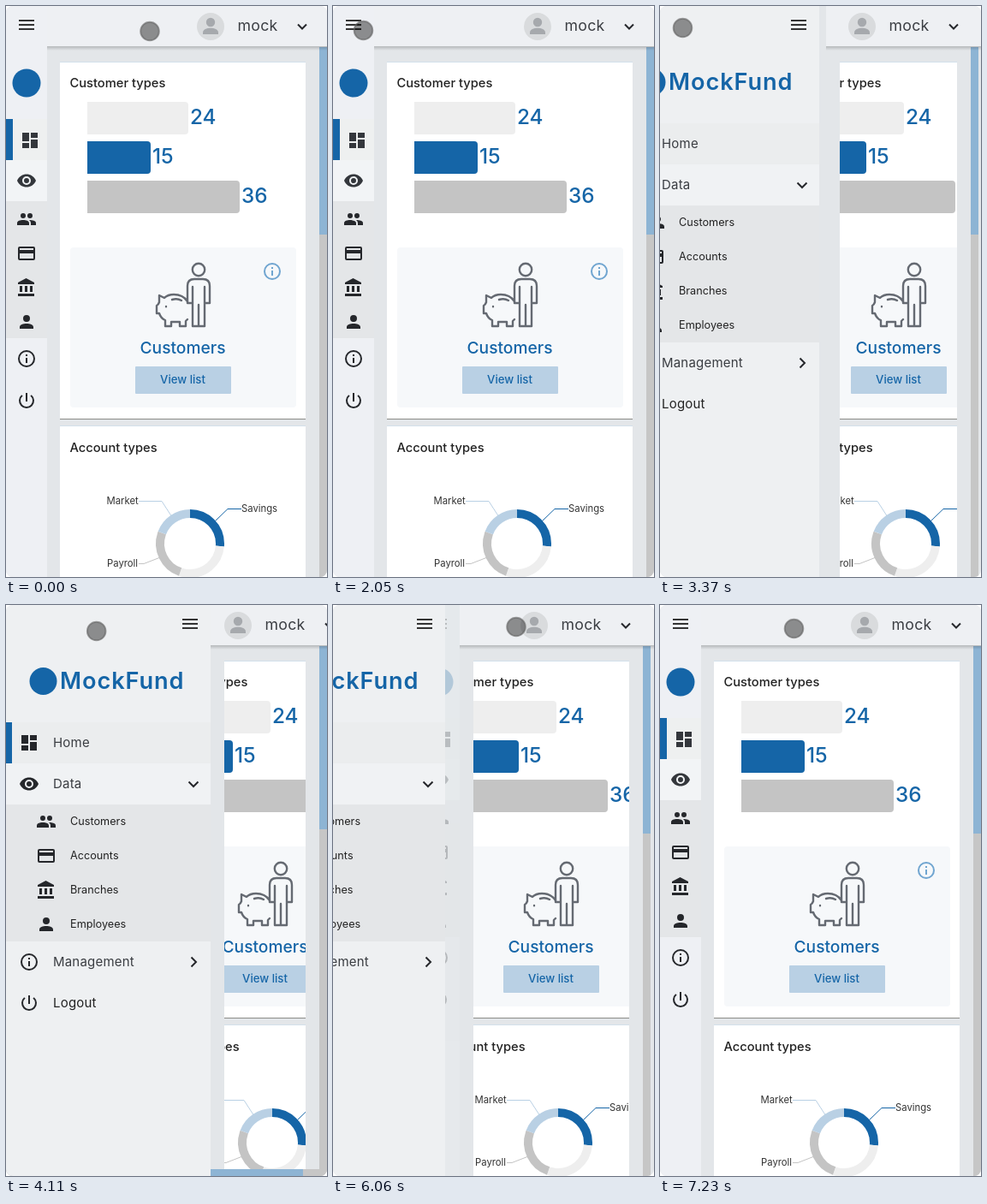
Write an HTML page that moves like this. It is 375 px wide and 667 px high and loops after 7840 ms.

```html
<!DOCTYPE html>
<html lang="en">
<head>
<meta charset="utf-8">
<title>Bank dashboard</title>
<style>
  html, body { margin: 0; width: 100%; height: 100%; overflow: hidden; background: #fff; }
  svg { display: block; border-radius: 8px; }
  text { font-family: Inter, "Open Sans", sans-serif; fill: #222; }
  .blue { fill: #1565a7; font-weight: 550; }
  .title { font-size: 14.7px; font-weight: 500; }
  .menu { font-size: 15px; letter-spacing: .2px; fill: #3a3d42; }
  .sub { font-size: 12.7px; }
  .tag { font-size: 11.3px; fill: #333; }
  .line { fill: none; stroke: #25272b; stroke-width: 2; }
</style>
</head>
<body>
<svg id="stage" width="375" height="667" viewBox="0 0 375 667"></svg>
<script>
const LOOP = 7840, MINI = 48, FULL = 239, BLUE = '#1565a7';

const ICONS = {
  home: 'M3 3h8v10H3zM3 15h8v6H3zM13 3h8v6h-8zM13 11h8v10h-8z',
  eye: 'M1 12C5 2 19 2 23 12C19 22 5 22 1 12zM7 12a5 5 0 0 0 10 0a5 5 0 0 0-10 0zM9 12a3 3 0 0 0 6 0a3 3 0 0 0-6 0z',
  people: 'M13 8a3 3 0 0 0 6 0a3 3 0 0 0-6 0zM5 8a3 3 0 0 0 6 0a3 3 0 0 0-6 0zM1 19v-2.5c0-4.6 14-4.6 14 0V19zM17 19v-2.5q0-2-2-3.4c4 0 8 1 8 3.4V19z',
  card: 'M4 4h16a2 2 0 0 1 2 2v12a2 2 0 0 1-2 2H4a2 2 0 0 1-2-2V6a2 2 0 0 1 2-2zM4 6v2h16V6zM4 12v6h16v-6z',
  bank: 'M4 10v7h3v-7zM10 10v7h3v-7zM2 22h19v-3H2zM16 10v7h3v-7zM11.5 1L2 6v2h19V6z',
  person: 'M8 8a4 4 0 0 0 8 0a4 4 0 0 0-8 0zM4 20v-2c0-5.3 16-5.3 16 0v2z',
  info: 'M2 12a10 10 0 0 0 20 0a10 10 0 0 0-20 0zM4 12a8 8 0 0 0 16 0a8 8 0 0 0-16 0zM11 7h2v2h-2zM11 11h2v6h-2z',
  power: 'M11 3h2v10h-2zM17.83 5.17l-1.42 1.42a7 7 0 1 1-8.82 0L6.17 5.17a9 9 0 1 0 11.66 0z'
};

const rect = (x, y, w, h, fill, more = '') =>
  `<rect x="${x}" y="${y}" width="${w}" height="${h}" fill="${fill}" ${more}/>`;
const text = (x, y, s, cls, more = '') => `<text x="${x}" y="${y}" class="${cls}" ${more}>${s}</text>`;
const icon = (name, x, y, fill = '#25272b') =>
  `<path d="${ICONS[name]}" transform="translate(${x - 12} ${y - 12})" fill="${fill}" fill-rule="evenodd"/>`;
const line = (d, more = '') => `<path class="line" d="${d}" ${more}/>`;
const burger = x => line(`M${x - 9} 17h18m-18 5h18m-18 5h18`, 'style="stroke:#333"');

const bar = (y, w, fill, value) =>
  `<path d="M95 ${y}h${w - 4}q4 0 4 4v30q0 4-4 4h${4 - w}z" fill="${fill}"/>` +
  text(95 + w + 2, y + 26, value, 'blue', 'font-size="24.3"');

const slice = (from, to, color) =>
  `<circle cx="215" cy="628" r="35" fill="none" stroke="${color}" stroke-width="10" pathLength="360"
    stroke-dasharray="${to - from} 360" transform="rotate(${from - 90} 215 628)"/>`;

const cards = `
  ${text(74.5, 95, 'Customer types', 'title')}
  ${bar(112, 118, '#eee', 24)}${bar(158, 74, BLUE, 15)}${bar(204, 178, '#c4c4c4', 36)}
  ${rect(75, 282, 264, 187, '#f6f8fa', 'rx="4"')}
  ${icon('info', 311, 310, '#70a5d0')}
  <g fill="none" stroke="#656a72" stroke-width="2.4" stroke-linejoin="round" stroke-linecap="round">
    <circle cx="225" cy="308" r="7.2"/>
    <path d="M218 328v46h14v-46M225 349v25M218 347h-6v-20q0-8 8-8h10q8 0 8 8v20h-6"/>
    <path d="M212 345c-4-6-10-8-16-8q-7 0-11 4l-6-3v8q-1 3-3 4v9h3q2 6 7 8v7h7v-5h10v5h7v-6l2-2M194 343q6-2 11 1M187 351v.2"/>
  </g>
  ${text(206.5, 406, 'Customers', 'blue', 'font-size="19.2" text-anchor="middle"')}
  ${rect(151, 421, 112, 32, '#b9d0e4', 'rx="1"')}
  ${text(206.5, 441, 'View list', 'blue', 'font-size="13.2" text-anchor="middle"')}
  ${rect(-40, 482, 500, 8, '#e3e6e9')}${rect(-40, 482, 500, 1, '#8c8c88')}
  ${rect(-40, 65, 500, 1, '#d3e0eb')}${rect(-40, 490, 500, 1, '#d3e0eb')}
  ${text(74.5, 521, 'Account types', 'title')}
  ${slice(0, 95, BLUE)}${slice(95, 199, '#eee')}${slice(199, 291, '#c4c4c4')}${slice(291, 360, '#b9d0e4')}
  <g fill="none">
    <path d="M155 578.500h27l11 17" stroke="#b9d0e4"/>
    <path d="M244 602l15-14.500h16" stroke="${BLUE}"/>
    <path d="M155 651.500h6l18-7" stroke="#c4c4c4"/>
  </g>
  ${text(117.5, 582, 'Market', 'tag')}${text(275, 591, 'Savings', 'tag')}${text(118, 655, 'Payroll', 'tag')}`;

const account = `
  <circle cx="239" cy="24" r="16" fill="#d9dbdd"/>
  <circle cx="239" cy="19" r="5.2" fill="#a6a9ad"/>
  <path d="M230 33v-2c0-7 18-7 18 0v2z" fill="#a6a9ad"/>
  ${text(270.5, 29, 'mock', '', 'font-size="17.7" letter-spacing=".3" style="fill:#3a3d42"')}
  ${line('M341 21.500l5 5 5-5')}`;

const subIcons = ['people', 'card', 'bank', 'person'];
const mini = `
  ${rect(0, 0, MINI, 667, '#eef0f4')}
  ${burger(24)}
  <circle cx="24" cy="90" r="16.500" fill="${BLUE}"/>
  ${rect(0, 132, MINI, 48, '#eef0f0')}${rect(0, 132, 8, 48, BLUE)}${icon('home', 28, 157, '#34373c')}
  ${rect(0, 180, MINI, 48, '#f2f4f6')}${icon('eye', 24, 204, '#34373c')}
  ${rect(0, 228, MINI, 160, '#e4e6e8')}
  ${subIcons.map((n, i) => icon(n, 24, 249 + 40 * i)).join('')}
  ${icon('info', 24, 412)}${icon('power', 24, 461)}`;

const full = `
  ${rect(0, 0, FULL, 667, '#eef0f2')}
  ${burger(215)}
  <circle cx="43.500" cy="89" r="16" fill="${BLUE}"/>
  ${text(63, 98, 'MockFund', 'blue', 'font-size="27.2" style="font-weight:600" letter-spacing=".9"')}
  ${rect(0, 137, FULL, 48, '#ebedee')}${rect(0, 137, 7, 48, BLUE)}
  ${icon('home', 27, 161)}${text(55, 166, 'Home', 'menu')}
  ${rect(0, 185, FULL, 48, '#f0f2f4')}
  ${icon('eye', 27, 209)}${text(55, 214, 'Data', 'menu')}${line('M213.500 206.500l5.500 5.500 5.500-5.500')}
  ${rect(0, 233, FULL, 160, '#e4e6e8')}
  ${subIcons.map((n, i) => icon(n, 47, 253 + 40 * i) +
    text(75, 257 + 40 * i, ['Customers', 'Accounts', 'Branches', 'Employees'][i], 'sub')).join('')}
  ${icon('info', 27, 417)}${text(55, 422, 'Management', 'menu')}${line('M216.500 411.500l5.500 5.500-5.500 5.500')}
  ${icon('power', 27, 465)}${text(55, 470, 'Logout', 'menu', 'style="fill:#222"')}`;

document.getElementById('stage').innerHTML = `
  <defs>
    <clipPath id="cardClip"><rect id="cardBox" y="65" height="602"/></clipPath>
    <linearGradient id="shade" x2="0" y2="1">
      <stop stop-color="#000" stop-opacity=".2"/><stop offset="1" stop-color="#000" stop-opacity="0"/>
    </linearGradient>
  </defs>
  ${rect(0, 0, 375, 667, '#e3e6e9')}
  <g id="page">
    <g clip-path="url(#cardClip)">${rect(0, 65, 375, 602, '#fff')}<g id="cards">${cards}</g></g>
    ${rect(366, 48, 9, 619, '#c6c6c6')}${rect(366, 48, 9, 219, '#8db4d4', 'id="thumbY"')}
    <g id="scrollX">${rect(0, 659, 375, 8, '#c6c6c6')}${rect(0, 659, 80, 8, '#8db4d4', 'id="thumbX"')}</g>
    <g id="header">${rect(0, 0, 375, 47, '#eef0f3')}${rect(0, 47, 375, 5, 'url(#shade)')}</g>
    <g id="account">${account}</g>
  </g>
  <g id="mini">${mini}</g>
  <g id="full">${full}</g>
  <circle id="cursor" r="10.800" fill="#000" fill-opacity=".42" stroke="#666" stroke-opacity=".6" stroke-width="2"/>`;

const el = {};
document.querySelectorAll('[id]').forEach(n => el[n.id] = n);

// time, x, y
const PATH = [
  [1100, 168, 29.5], [1250, 152, 31], [1650, 78, 32.5], [1850, 52, 32], [1920, 46, 30],
  [2050, 35.5, 28.5], [2250, 30, 28], [2420, 29.5, 27.5], [2510, 26.5, 25.5],
  [3480, 26.5, 25.5], [3650, 36, 27.5], [3920, 68, 30], [4110, 105.5, 30.5], [4500, 174, 31], [4710, 199, 30.5],
  [4790, 202, 30], [5190, 212, 28], [5440, 212, 27.5], [5530, 214, 25.5],
  [6560, 214, 25.5], [6700, 206, 25.5], [7050, 168, 27], [7230, 156.5, 27.5]
];

function cursorAt(t) {
  const i = PATH.findIndex(k => k[0] > t);
  if (i === 0) return PATH[0].slice(1);
  if (i < 0) return PATH[PATH.length - 1].slice(1);
  const a = PATH[i - 1], b = PATH[i], u = (t - a[0]) / (b[0] - a[0]);
  return [a[1] + (b[1] - a[1]) * u, a[2] + (b[2] - a[2]) * u];
}

// cubic-bezier(.4, 0, .2, 1)
function ease(x) {
  if (x <= 0) return 0;
  if (x >= 1) return 1;
  let lo = 0, hi = 1, p;
  for (let i = 0; i < 24; i++) {
    p = (lo + hi) / 2;
    const q = 1 - p;
    if (1.2 * q * q * p + .6 * q * p * p + p ** 3 < x) lo = p; else hi = p;
  }
  return p * p * (3 - 2 * p);
}

const move = (node, x, y = 0) => node.setAttribute('transform', `translate(${x} ${y})`);

function draw(t) {
  const open = ease((t - 3165) / 410) - ease((t - 5915) / 440);
  const shift = Math.round(-17 * open * (1 - open));
  const left = Math.round(MINI + (FULL - MINI) * open);
  const cardX = Math.round(left + 15 + open);
  const over = Math.max(0, left + 16 - 223);

  move(el.page, shift);
  el.cardBox.setAttribute('x', cardX);
  el.cardBox.setAttribute('width', 350 - cardX);
  move(el.cards, Math.floor((cardX - 63) / 2));
  move(el.header, left);
  move(el.account, over);
  el.thumbY.setAttribute('height', over > 3 ? 214 : 219);
  el.scrollX.style.display = over > 3 ? '' : 'none';
  el.thumbX.setAttribute('x', left);
  el.thumbX.setAttribute('width', (366 - left) * .85);
  move(el.mini, left + shift - MINI);
  el.mini.style.opacity = Math.max(0, 1 - 1.4 * open);
  move(el.full, Math.round(FULL * (open - 1)));
  move(el.cursor, ...cursorAt(t));
}

const start = performance.now();
function tick() {
  draw((performance.now() - start) % LOOP);
  requestAnimationFrame(tick);
}
tick();
</script>
</body>
</html>
```
